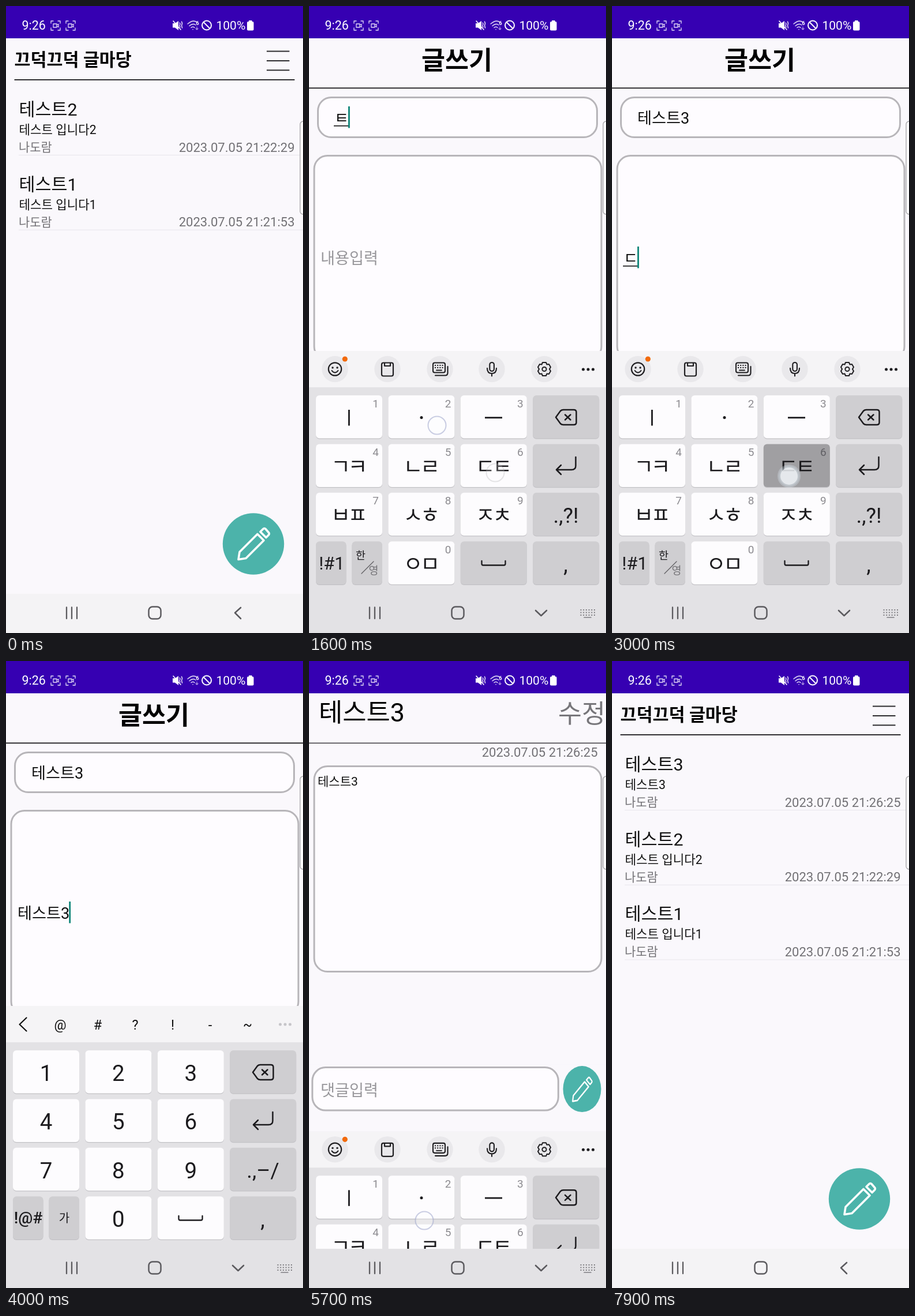
Write an HTML page with a canvas that moves like this. It is 515x1087 px and loops after 8000 ms.

```html
<!DOCTYPE html>
<html lang="ko">
<head>
<meta charset="utf-8">
<title>Memo app</title>
<style>
html, body { margin: 0; width: 515px; height: 1087px; overflow: hidden; background: #faf8fc; }
canvas { display: block; }
</style>
</head>
<body>
<canvas id="stage" width="515" height="1087"></canvas>
<script>
const W = 515, H = 1087, LOOP = 8000, STEP = 100;
const c = document.getElementById('stage').getContext('2d');
const BG = '#faf8fc', INK = '#111', TEAL = '#4cb3aa', EDGE = '#b7b5b9', GRAY = '#727175', BOX = '#fefcff';
const FONT = 'Roboto, "Noto Sans CJK KR", "Noto Sans CJK", sans-serif';
const APP = '끄덕끄덕 글마당', WRITER = '나도람';

// taps: time, x, y
const taps = [
  [300, 429, 930], [600, 230, 193],
  [1200, 320, 800], [1300, 323, 809], [1500, 222, 727], [1700, 70, 722], [1800, 66, 718],
  [1900, 196, 886], [2000, 318, 720], [2100, 316, 806], [2200, 320, 808], [2300, 322, 722],
  [2400, 40, 968], [2500, 318, 718], [2600, 240, 440],
  [3000, 307, 815], [3100, 312, 812], [3200, 200, 722], [3300, 62, 722], [3400, 196, 888],
  [3500, 40, 968], [3600, 320, 718], [4600, 402, 1052], [5000, 349, 667], [5300, 200, 200],
  [5600, 200, 970], [5900, 316, 808], [6000, 52, 722], [6100, 200, 722], [6200, 43, 724],
  [6600, 194, 886], [6800, 68, 806], [6900, 318, 720], [7000, 192, 806], [7100, 196, 804],
  [7200, 473, 555], [7500, 402, 1052]
];

// typed text; a trailing "_" marks text still being composed
const titleKeys = [[0, ''], [1200, 'ㄷ_'], [1300, 'ㅌ_'], [1700, '터_'], [1800, '테_'], [1900, '텟_'],
  [2000, '테스_'], [2100, '테슫_'], [2200, '테슽_'], [2300, '테스트_'], [2500, '테스트3']];
const bodyKeys = [[0, ''], [3000, 'ㄷ_'], [3100, 'ㅌ_'], [3300, '테_'], [3400, '테스_'], [3500, '테스트_'], [3600, '테스트3']];
const noteKeys = [[0, ''], [5900, 'ㄷ_'], [6000, '디_'], [6100, '다_'], [6200, '대_'], [6600, '댓_'],
  [6800, '댓ㄱ_'], [6900, '댓그_'], [7000, '댓근_'], [7100, '댓글_'], [7300, '']];

const posts = [
  ['테스트3', '테스트3', '2023.07.05 21:26:25'],
  ['테스트2', '테스트 입니다2', '2023.07.05 21:22:29'],
  ['테스트1', '테스트 입니다1', '2023.07.05 21:21:53']
];
const jamo = ['ㄱㅋ', 'ㄴㄹ', 'ㄷㅌ', 'ㅂㅍ', 'ㅅㅎ', 'ㅈㅊ', 'ㅇㅁ'];

const ramp = (t, a, b) => {
  const p = Math.min(1, Math.max(0, (t - a) / (b - a)));
  return 1 - (1 - p) * (1 - p);
};

function text(s, x, y, size, color = INK, align = 'left', weight = 400) {
  c.font = `${weight} ${size}px ${FONT}`;
  c.textAlign = align;
  c.fillStyle = color;
  c.fillText(s, x, y);
}
function rect(x, y, w, h, color) {
  c.fillStyle = color;
  c.fillRect(x, y, w, h);
}
function round(x, y, w, h, r, fill, stroke, lw = 3) {
  c.beginPath();
  c.roundRect(x, y, w, h, r);
  if (fill) { c.fillStyle = fill; c.fill(); }
  if (stroke) { c.strokeStyle = stroke; c.lineWidth = lw; c.stroke(); }
}
function disc(x, y, r, color, ry = r) {
  c.beginPath();
  c.ellipse(x, y, r, ry, 0, 0, 7);
  c.fillStyle = color;
  c.fill();
}
function ring(x, y, r, color, lw) {
  c.beginPath();
  c.arc(x, y, r, 0, 7);
  c.strokeStyle = color;
  c.lineWidth = lw;
  c.stroke();
}
function path(d, color, lw, x = 0, y = 0) {
  c.save();
  c.translate(x, y);
  c.strokeStyle = color;
  c.lineWidth = lw;
  c.lineCap = c.lineJoin = 'round';
  c.stroke(new Path2D(d));
  c.restore();
}

function pencil(x, y, sx, sy, lw) {
  c.save();
  c.translate(x, y);
  c.scale(sx, sy);
  path('M-26 27L-24 14L7 -17L18 -6L-13 25ZM12 -21L17 -26Q19 -28 21 -26L27 -19Q28 -17 26 -15L22 -11Z', '#fff', lw);
  c.restore();
}

function status(t) {
  rect(0, 0, W, 56, '#3600b2');
  text('9:26', 27.5, 41, 21.4, '#fff');
  const first = Math.floor(t / 500) % 4 !== 1;
  [78, 104].forEach((x, i) => {
    path('M0 4V0H4M12 0H16V4M16 12V16H12M4 16H0V12', '#e4dcf6', 1.3, x, 26);
    if (i || first) path('M4 5H10V11H4ZM10 7L13 5.5V10.5L10 9', '#e4dcf6', 1.3, x, 26);
  });
  c.fillStyle = '#fff';
  c.fill(new Path2D('M289 30H293L299 26V42L293 37.5H289Z'));
  path('M290 26L303 41', '#fff', 1.6);
  path('M301 29L302 31L301 34L302 37M304.5 27L305.5 30L304.5 34L305.5 38', '#fff', 1.3);
  path('M315 31Q324 23 331 28M318 34.5Q324 29 329 33M321 37.5Q324 35 327 37.5M324 40.5V40.7', '#d9cef2', 1.6);
  text('6', 329.5, 32.5, 9, '#fff', 'left', 700);
  path('M331 36V41M329 39L331 41L333 39', '#b9a6e6', 1.1);
  ring(348, 33.5, 8, '#fff', 2);
  path('M342.5 28L353.5 39', '#fff', 2);
  text('100%', 364.5, 41, 21, '#fff');
  round(418, 27, 11.5, 15.5, 2, '#fff');
  rect(421, 25, 5.5, 3, '#fff');
}

function handle() {
  round(510, 200, 20, 161, 5, '#fdfcfe', '#a8a7aa', 1.4);
}

function nav(kb) {
  rect(0, 1019, W, 68, kb ? '#e3e2e5' : '#f4f3f5');
  const ink = '#5c5b5f';
  path('M105 1042.5V1062M114 1042.5V1062M123 1042.5V1062', ink, 2.3);
  round(247.5, 1041.5, 21, 21, 6.5, null, ink, 2.5);
  if (!kb) return path('M407 1043L397 1052L407 1062', ink, 2.6);
  path('M393 1048L402.5 1057L412 1048', ink, 2.6);
  for (let j = 0; j < 3; j++)
    for (let i = 0; i < 6; i++) rect(470.5 + i * 4.7, 1046 + j * 4.5, 2, 2, '#7f7e82');
  path('M477 1060H489', '#7f7e82', 1.6);
}

function listScreen(items) {
  rect(0, 55, W, H, BG);
  text(APP, 14.5, 104, 30.4, '#000', 'left', 700);
  for (const y of [78.5, 95, 111.3]) rect(452, y - 1, 39.5, 2, '#2c2b2e');
  rect(14.5, 127, 486, 1.8, '#1b1a1d');
  items.forEach(([title, body, date], i) => {
    const y = i * 129.7;
    text(title, 22.5, y + 190, 30.4);
    text(body, 22.5, y + 222, 21.2);
    text(WRITER, 22, y + 252, 20.9, GRAY);
    text(date, 500.5, y + 252.5, 22, GRAY, 'right');
    rect(22, y + 258, W, 1, '#e8e6eb');
  });
  disc(429, 932.5, 53.2, TEAL);
  pencil(429, 932.5, 1, 1, 3.6);
}

// editable line with hint, composing underline and caret
function field(keys, x, y, hint, focus, t, size = 27.2) {
  let [at, s] = keys[0];
  for (const k of keys) if (t >= k[0]) [at, s] = k;
  const open = s.endsWith('_');
  if (open) s = s.slice(0, -1);
  text(s || hint, x, y, size, s ? INK : '#98979b');
  const w = s ? c.measureText(s).width : 0;
  if (open) rect(x - 1, y + 3, w + 1, 1.6, INK);
  if (focus && (t - at) % 1000 < 500) rect(x + w - 1, y - 30, 2.8, 37.5, '#0d8578');
}

function writeScreen(t) {
  rect(0, 55, W, H, BG);
  text('글쓰기', 256.5, 110, 44.6, '#000', 'center', 700);
  rect(0, 141.4, W, 1.8, '#1b1a1d');
  round(15.5, 158.5, 484, 69, 23, BOX, EDGE);
  field(titleKeys, 44, 204, '제목입력', t >= 700 && t < 2700, t);
  round(9, 259.5, 498, 354, 23, BOX, EDGE);
  field(bodyKeys, 20, 447, '내용입력', t >= 2700, t);
  round(15.5, 631, 484, 66, 21, TEAL, EDGE);
  text('저장', 257.5, 682, 45, '#0c1a18', 'center', 500);
}

function detailScreen(t, kb) {
  const dy = 421 * (1 - kb);
  rect(0, 55, W, H, BG);
  text('테스트3', 17, 105, 44.8, '#000');
  text('수정', 514, 107, 44.6, '#77767a', 'right');
  rect(0, 141.6, W, 1.5, '#3a393c');
  text('2023.07.05 21:26:25', 500.5, 166, 22, GRAY, 'right');
  round(9, 182.5, 498, 356, 23, BOX, EDGE);
  text('테스트3', 15, 215.5, 21);
  rect(0, 512 + dy, W, 100, BG);
  round(5.8, 517.5 + dy, 426.5, 74.5, 23, BOX, EDGE);
  field(noteKeys, 20, 567 + dy, '댓글입력', t >= 5700 && t < 7300, t);
  disc(473.5, 555 + dy, 33, TEAL, 40);
  pencil(473.5, 555.5 + dy, 0.63, 0.77, 3.4);
}

function dots(color) {
  for (const x of [475.5, 484, 492.5]) disc(x, 630, 2.5, color);
}
function toolIcons() {
  const ink = '#1f1e21';
  for (const x of [45, 136, 227, 317, 408]) disc(x, 629.5, 22.7, '#e9e8eb');
  ring(45, 629.5, 11.2, ink, 2.2);
  disc(41, 627, 1.7, ink);
  disc(49, 627, 1.7, ink);
  path('M39.5 632Q45 639 50.5 632', ink, 2);
  disc(62.3, 612, 4.6, '#f26a0c');
  round(126, 618.5, 20, 23, 3, null, ink, 2.2);
  path('M131 619V624H141V619', ink, 2.2);
  round(215, 618.5, 21, 17, 3, null, ink, 2.1);
  path('M219 640.5H236Q240.5 640.5 240.5 636V625', ink, 2.1);
  for (const y of [623, 627]) for (const x of [219, 223.2, 227.4, 231.6]) rect(x - 1, y - 1, 2, 2, ink);
  path('M221 631.5H230', ink, 1.8);
  round(313.3, 618, 7.6, 15, 4, null, ink, 2.1);
  path('M309 628Q309 637 317 637Q325 637 325 628M317 637V641.5', ink, 2.1);
  path('M405 618H411L412.5 621.5L416 621L419 626L417 629.5L419 633L416 638L412.5 637.5L411 641H405L403.5 637.5L400 638L397 633L399 629.5L397 626L400 621L403.5 621.5Z', ink, 2);
  ring(408, 629.5, 3.6, ink, 2);
  dots(ink);
}
function toolbar(mode) {
  if (mode === 'icons') return toolIcons();
  path('M35.5 618.5L23.5 630L35.5 641.5', INK, 2.2);
  if (mode === 'num') {
    ['@', '#', '?', '!', '-', '~'].forEach((s, i) => text(s, 94 + i * 65, 639, 23.5, INK, 'center'));
    dots('#c6c5c9');
  } else {
    ['다', '더', '또'].forEach((s, i) => text(s, 127.5 + i * 130, 638, 21.5, i ? '#48474a' : INK, 'center'));
    dots('#1f1e21');
  }
}

function keyCells() {
  const cells = [];
  for (let r = 0; r < 4; r++)
    for (let k = 0; k < 4; k++) {
      const x = 12 + k * 125.4, y = 675 + r * 84.4;
      if (r === 3 && k === 0) cells.push({ x, y, w: 52.5, r, k }, { x: 74.5, y, w: 52.5, r, k });
      else cells.push({ x, y, w: 115, r, k });
    }
  return cells;
}
const cells = keyCells();

function keyboard(t, kb) {
  const num = (t >= 2500 && t < 2700) || (t >= 3600 && t < 5000);
  const ink = '#1c1b1e';
  c.save();
  c.translate(0, 489 * (1 - kb));
  rect(0, 598, W, 64, '#f5f4f6');
  rect(0, 661, W, 430, '#e3e2e5');
  toolbar(num ? 'num' : t >= 6300 ? 'words' : 'icons');
  const down = taps.filter(p => p[0] === t);
  for (const { x, y, w, r, k } of cells) {
    const gray = k === 3 || (r === 3 && (k === 0 || (k === 2 && !num)));
    const hit = kb === 1 && down.some(p => p[1] >= x && p[1] <= x + w && p[2] >= y && p[2] <= y + 75);
    round(x, y + 1.3, w, 74.5, 6, '#c3c2c6');
    round(x, y, w, 74.5, 6, hit ? '#a09fa2' : gray ? '#cfced1' : '#fdfcfe');
  }
  for (let n = 1; n <= 10; n++) {
    const k = n === 10 ? 1 : (n - 1) % 3, r = Math.floor((n - 1) / 3);
    const x = 69.5 + k * 125.4, y = 675 + r * 84.4;
    if (num) {
      text(n % 10, x, y + 53, 38.5, ink, 'center');
      continue;
    }
    text(n % 10, x + 51.5, y + 20.5, 19, 'rgba(40,38,45,.53)', 'right');
    if (n > 3) [...jamo[n - 4]].forEach((s, i) => text(s, x - 14.5 + i * 29.5, y + 52.5, 37, ink, 'center'));
  }
  if (!num) {
    rect(68, 700, 2.8, 27.5, ink);
    disc(195, 713.5, 2.5, ink);
    rect(305, 712.3, 30, 2.8, ink);
    text('!#1', 39.5, 977, 31, ink, 'center');
    text('한', 81, 959, 18.5, ink);
    text('영', 103.5, 985, 18.5, '#747377');
    path('M91 984L112 963', '#5d5c60', 1.2);
  } else {
    text('!@#', 38.5, 975, 28, ink, 'center', 500);
    text('가', 101, 973, 20, ink, 'center');
  }
  text(num ? '.,–/' : '.,?!', 445.5, 896, 37, ink, 'center');
  text(',', 445, 981, 38, ink, 'center');
  path('M299.5 962V967Q299.5 969.5 302 969.5H338Q340.5 969.5 340.5 967V962', ink, 2.3);
  path('M428 713L436 702Q438 700 441 700H459Q463.5 700 463.5 704V722Q463.5 726 459 726H441Q438 726 436 724ZM444 708.5L453.5 717.5M453.5 708.5L444 717.5', ink, 2.5);
  path('M462.5 782V797Q462.5 804 455 804H429M437 796L429 804L437 812', ink, 2.5);
  c.restore();
}

function touches(t) {
  for (const [at, x, y] of taps) {
    const age = t - at;
    if (age < 0 || age > 300) continue;
    if (age === 0) {
      disc(x, y, 20, 'rgba(225,240,250,.28)');
      disc(x, y, 17.5, 'rgba(225,240,250,.25)');
      disc(x, y, 15, 'rgba(245,247,250,.7)');
    } else if (age < 300) {
      disc(x, y, 16, 'rgba(255,255,255,.25)');
      ring(x, y, 15.5, 'rgba(150,158,200,.5)', 2);
    } else {
      disc(x, y, 16, 'rgba(255,255,255,.2)');
      ring(x, y, 15.5, 'rgba(140,140,145,.22)', 2);
    }
  }
}

// a screen fades in from the right, or back out
function enter(p, draw) {
  c.save();
  c.globalAlpha = p;
  c.translate(90 * (1 - p), 0);
  draw();
  c.restore();
}

function render(t) {
  const kb = t < 5500
    ? ramp(t, 600, 900) * (1 - ramp(t, 4600, 4900))
    : ramp(t, 5600, 5900) * (1 - ramp(t, 7200, 7500));
  const write = ramp(t, 300, 600) * (1 - ramp(t, 5100, 5400));
  const detail = ramp(t, 5400, 5700) * (1 - ramp(t, 7600, 7800));
  listScreen(t < 5000 ? posts.slice(1) : posts);
  if (write) enter(write, () => writeScreen(t));
  if (detail) enter(detail, () => detailScreen(t, kb));
  handle();
  if (kb > 0) keyboard(t, kb);
  nav(kb > 0);
  status(t);
  touches(t);
}

function tick() {
  const t = performance.now() % LOOP;
  render(Math.floor(t / STEP) * STEP);
  requestAnimationFrame(tick);
}
tick();
</script>
</body>
</html>
```
